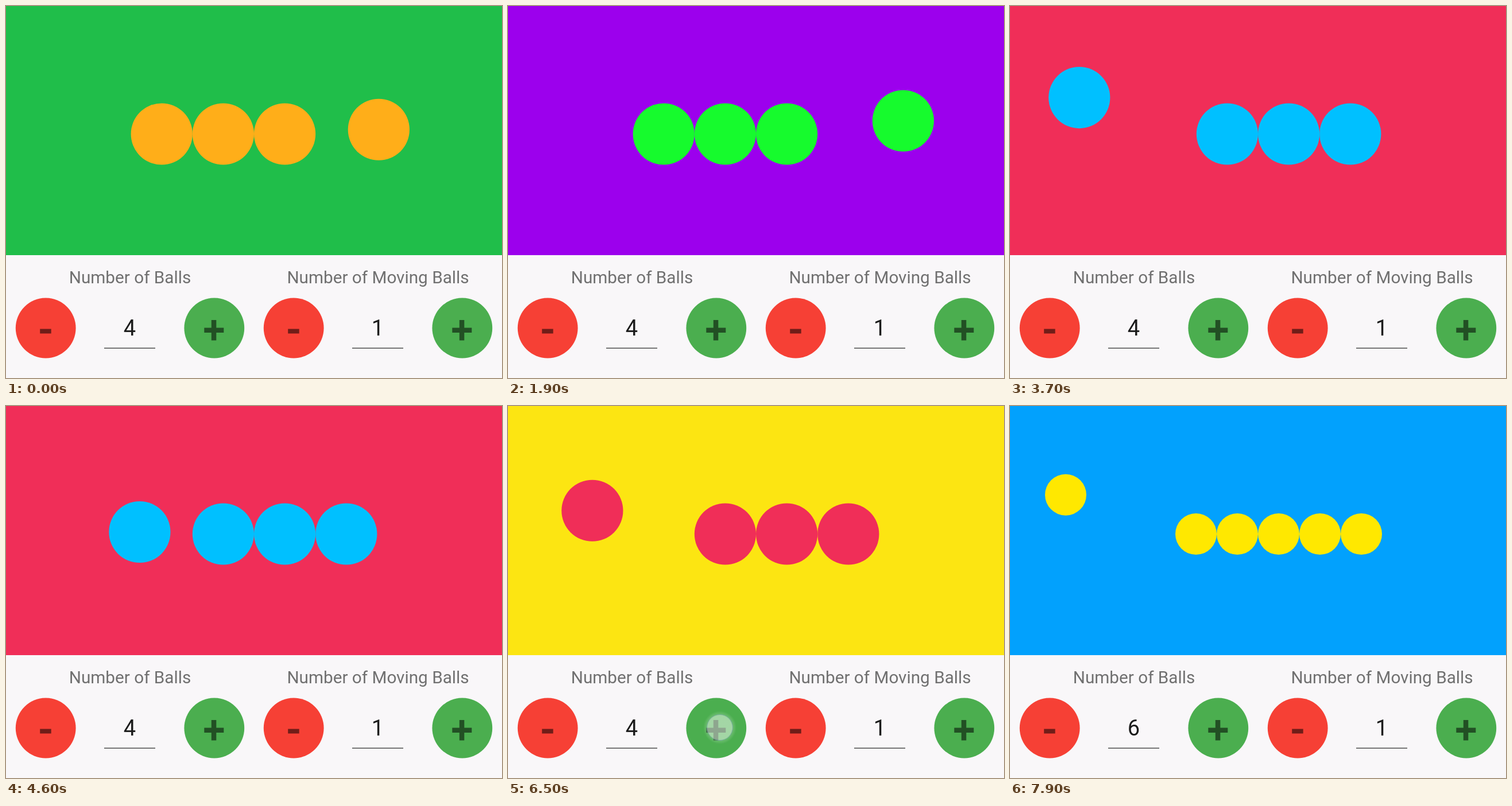
Write an HTML page that moves like this. It is 864 by 648 pixels and loops after 8 s.

```html
<!DOCTYPE html>
<html lang="en">
<head>
<meta charset="utf-8">
<title>Ball cradle</title>
<style>
  html, body { margin: 0; width: 100%; height: 100%; overflow: hidden; background: #f9f7f9; }
  svg { display: block; width: 100%; height: 100%; }
  text { font-family: Roboto, sans-serif; text-anchor: middle; }
  .label { font-size: 29.7px; fill: #707070; }
  .value { font-size: 38px; fill: #1b1b1b; }
  .sign { fill: #000; fill-opacity: .54; }
</style>
</head>
<body>
<svg viewBox="0 0 864 648">
  <defs>
    <radialGradient id="glow">
      <stop offset=".7" stop-color="#fff" stop-opacity=".45"/>
      <stop offset="1" stop-color="#fff" stop-opacity="0"/>
    </radialGradient>
    <g id="minus">
      <circle r="52.4" fill="#f64035"/>
      <path class="sign" d="M-10 1.5h19.5v8h-19.5z"/>
    </g>
    <g id="plus">
      <circle r="52.4" fill="#4bae4f"/>
      <path class="sign" d="M-5 -14h8.5v13.5h13v8.5h-13v13.5h-8.5v-13.5h-12.5v-8.5h12.5z"/>
    </g>
  </defs>
  <rect width="864" height="648" fill="#f9f7f9"/>
  <rect id="sky" width="864" height="434"/>
  <g id="balls"></g>
  <g id="panel"></g>
  <g id="touch">
    <circle cx="369" cy="560" r="29" fill="url(#glow)" opacity=".55"/>
    <circle cx="369" cy="560" r="22.5" fill="#fff" fill-opacity=".32" stroke="#6a9fa0" stroke-opacity=".7"/>
  </g>
</svg>
<script>
const NS = 'http://www.w3.org/2000/svg';
const LOOP = 8000, MIDDLE = 432, REST_Y = 223, ROPE = 210, SWING = 50 * Math.PI / 180;
const LEFT = -1, RIGHT = 1;
const $ = id => document.getElementById(id);

function add(parent, tag, attrs, text = '') {
  const el = document.createElementNS(NS, tag);
  for (const key in attrs) el.setAttribute(key, attrs[key]);
  el.textContent = text;
  return parent.appendChild(el);
}

function set(el, attrs) {
  for (const key in attrs) el.setAttribute(key, attrs[key]);
}

const themes = {
  green: ['#20be4a', '#ffae19'],
  blue: ['#02a1fd', '#ffe800'],
  purple: ['#9c00ed', '#16fb2d'],
  pink: ['#f02e58', '#00c0ff'],
  orange: ['#ff921d', '#6524c4'],
  yellow: ['#fce512', '#f02e58']
};

// Each swing runs from one impact to the next, topping out at its peak.
const swings = [
  { start: -1371, peak: -621, side: RIGHT, count: 4, theme: 'green' },
  { start: 129, peak: 968, side: LEFT, count: 4, theme: 'blue' },
  { start: 1665, peak: 2396, side: RIGHT, count: 4, theme: 'purple' },
  { start: 3145, peak: 3930, side: LEFT, count: 4, theme: 'pink' },
  { start: 4685, peak: 5423, side: RIGHT, count: 4, theme: 'orange' },
  { start: 6146, peak: 6891, side: LEFT, count: 4, theme: 'yellow' },
  { start: 6590, peak: 7340, side: LEFT, count: 5, theme: 'blue' },
  { start: 6986, peak: 7736, side: LEFT, count: 6, theme: 'blue' },
  { start: 8486 }
];
const taps = [[6450, 6590], [6850, 6990]];

function addCounter(x, label, value) {
  const panel = $('panel');
  add(panel, 'text', { class: 'label', x: x + 216, y: 483 }, label);
  add(panel, 'use', { href: '#minus', x: x + 69.2, y: 561 });
  add(panel, 'use', { href: '#plus', x: x + 362.8, y: 561 });
  add(panel, 'rect', { x: x + 171, y: 595, width: 89, height: 2, fill: '#767676' });
  return add(panel, 'text', { class: 'value', x: x + 215.5, y: 574 }, value);
}

const total = addCounter(0, 'Number of Balls', 4);
addCounter(432, 'Number of Moving Balls', 1);
const balls = Array.from({ length: 6 }, () => add($('balls'), 'circle', {}));

function draw(t) {
  const index = swings.findIndex((s, i) => t < swings[i + 1].start);
  const { start, peak, side, count, theme } = swings[index];
  // A changed count cuts a swing short, so the fall may end after the next start.
  const next = swings[index + 1];
  const end = next.count && next.count !== count ? 2 * peak - start : next.start;
  const u = (t - peak) / (t < peak ? peak - start : end - peak);
  const angle = SWING * (1 - u * u);

  const radius = Math.min(53.6, 216 / count);
  const moving = side === LEFT ? 0 : count - 1;
  const [sky, paint] = themes[theme];

  $('sky').setAttribute('fill', sky);
  $('balls').setAttribute('fill', paint);
  balls.forEach((ball, i) => {
    const lift = i === moving ? angle : 0;
    set(ball, {
      cx: MIDDLE + (2 * i - count + 1) * radius + side * ROPE * Math.sin(lift),
      cy: REST_Y - ROPE * (1 - Math.cos(lift)),
      r: i < count ? radius : 0
    });
  });
  total.textContent = count;
  const touched = taps.some(([down, up]) => t >= down && t < up);
  $('touch').setAttribute('visibility', touched ? 'visible' : 'hidden');
}

const begin = performance.now();
function tick() {
  draw((performance.now() - begin) % LOOP);
  requestAnimationFrame(tick);
}
tick();
</script>
</body>
</html>
```
